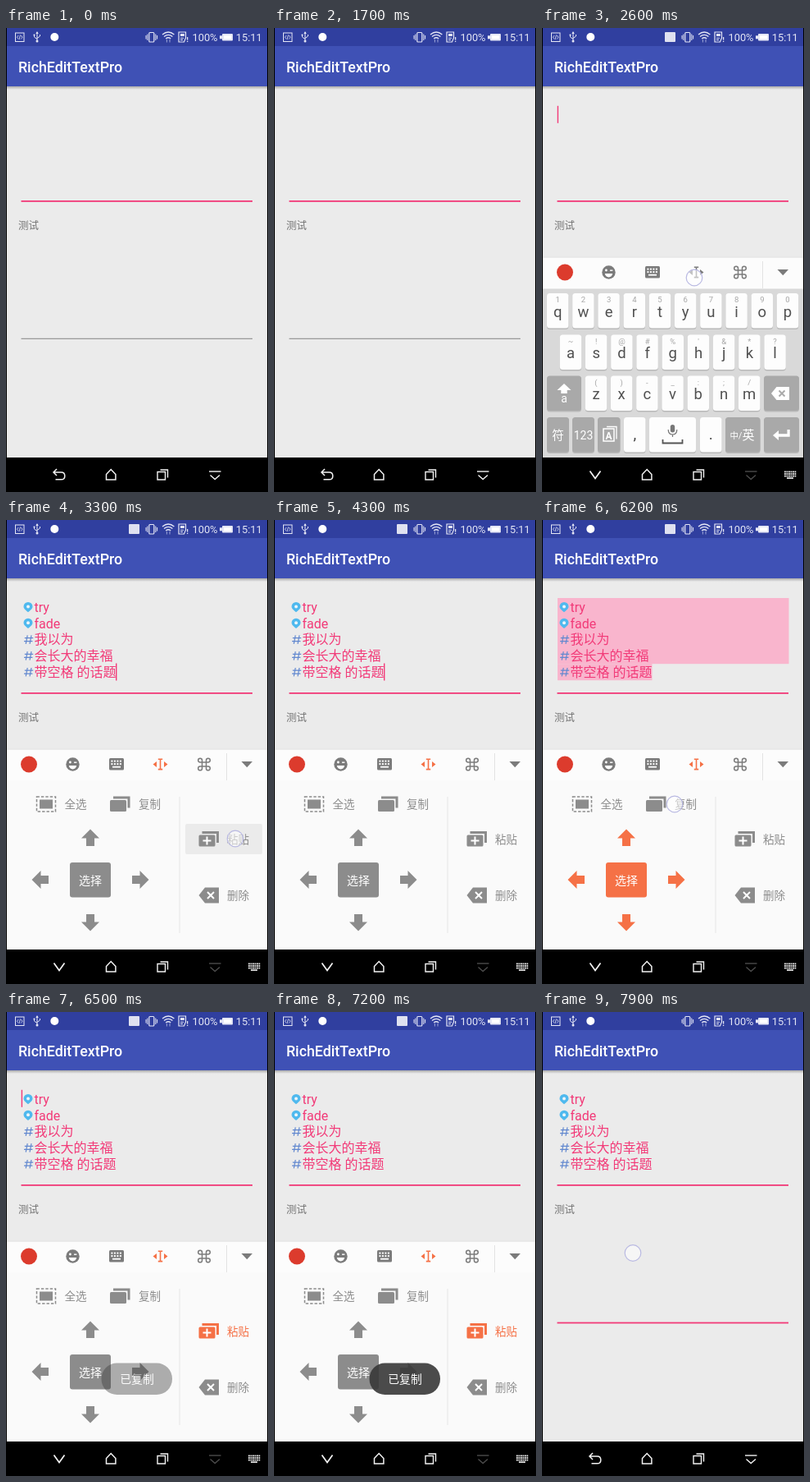
Recreate the animation shown at these times as an HTML page. Size 320 by 565 pixels, loop 8000 ms.

```html
<!DOCTYPE html>
<html lang="zh">
<head>
<meta charset="utf-8">
<title>RichEditTextPro</title>
<style>
  html, body { margin: 0; width: 100%; height: 100%; overflow: hidden; background: #000; }
  svg { display: block; width: 100vw; height: 100vh; font-family: Roboto, "Noto Sans CJK SC", "Noto Sans CJK", sans-serif; }
</style>
</head>
<body>
<svg id="stage" viewBox="0 0 320 565" xmlns="http://www.w3.org/2000/svg"></svg>
<script>
const LOOP = 8000, PINK = '#f23a78', ORANGE = '#f57146', GRAY = '#8c8c8c';

const rect = (x, y, w, h, fill, extra = '') =>
  `<rect x="${x}" y="${y}" width="${w}" height="${h}" fill="${fill}" ${extra}/>`;
const circle = (x, y, r, fill, extra = '') => `<circle cx="${x}" cy="${y}" r="${r}" fill="${fill}" ${extra}/>`;
const path = (d, fill, extra = '') => `<path d="${d}" fill="${fill}" ${extra}/>`;
const line = (d, stroke, width = 1, extra = '') =>
  `<path d="${d}" fill="none" stroke="${stroke}" stroke-width="${width}" ${extra}/>`;
const escapeText = s => s.replace(/&/g, '&amp;').replace(/</g, '&lt;');
const text = (s, x, y, size, fill, extra = '') =>
  `<text x="${x}" y="${y}" font-size="${size}" fill="${fill}" ${extra}>${escapeText(s)}</text>`;
const group = (id, body, extra = '') => `<g id="${id}" ${extra}>${body}</g>`;
const MID = 'text-anchor="middle"';

function statusBar() {
  const c = '#e4e6f5';
  return rect(1, 0, 318, 22, '#303f9f') +
    rect(11.5, 6, 10.5, 10.5, 'none', `stroke="${c}"`) +
    line('M15.2 9l-1.8 2.2 1.8 2.2M18.3 9l1.8 2.2-1.8 2.2M17.5 8.5l-1.4 5.4', c, .8) +
    line('M38 5v11M34.5 8.5v2.5l3.5 2.5M41.5 8v2l-3.5 2.5', c, 1) +
    path('M36.3 7l1.7-3 1.7 3z', c) + circle(38, 16, 1.5, c) + circle(34.5, 8.5, 1.1, c) +
    circle(59.3, 11, 5, '#fff') +
    group('imeStatus', rect(150, 5, 13, 12, '#dfe1f0', 'rx="1"')) +
    rect(174.8, 5.5, 6, 11.5, 'none', `rx="1" stroke="${c}" stroke-width="1.2"`) +
    line('M172.8 7.5v7.5M171 9v4.5M182.8 7.5v7.5M184.6 9v4.5', c, 1) +
    line('M191 8q7.2-6 14.4 0M193 10.5q5.2-4.4 10.4 0M195.2 13q3-2.6 6 0', c, 1.3) +
    line('M196.4 14v3.5M200 14v3.5', '#9da6d8', 1) +
    path('M211 5h8.5v7l-2 5H211z', 'none', `stroke="${c}" stroke-width="1.2"`) +
    rect(213, 7, 4.8, 3, c) + line('M213 12.3h4M213 14.5h3', c, 1) +
    line('M221.6 11v3.6M221.6 15.8v1.3', c, 1.3) +
    text('100%', 227.5, 16, 12.8, c) +
    rect(264, 7, 13, 8.5, c, 'rx="1"') + rect(261, 9.3, 3, 4, c) + rect(266, 9, 9, 4.5, '#fff') +
    text('15:11', 280.8, 16, 12.8, c);
}

function richText() {
  const rows = ['try', 'fade', '我以为', '会长大的幸福', '带空格 的话题'];
  return rows.map((s, i) => {
    const y = 106 + i * 19.8;
    const icon = i < 2
      ? path(`M27 ${y + 6.3}C24.5 ${y + 4} 21.5 ${y + 2.5} 21.5 ${y - .7}A5.5 5.3 0 0 1 32.5 ${y - .7}C32.5 ${y + 2.5} 29.5 ${y + 4} 27 ${y + 6.3}z`, '#4fb9ee') +
        circle(27, y - .5, 2, '#eef6fa')
      : line(`M26.2 ${y - 5.2}l-2 10.4M31 ${y - 5.2}l-2 10.4M22.8 ${y - 2}h10.4M22 ${y + 2}h10.4`, '#6288cf', 1.2);
    return icon + text(s, 34.5, y + 5.8, 16, PINK);
  }).join('');
}

function selection() {
  let s = rect(19, 95, 282.5, 80.2, '#f9b5cd');
  return s + rect(19, 175.2, 115.5, 20, '#f9b5cd');
}

function toolbar() {
  const c = '#7b7b7b';
  let keys = '';
  for (let r = 0; r < 2; r++) for (let k = 0; k < 4; k++) keys += rect(128.4 + k * 3.5, 292.6 + r * 3.5, 2, 2, '#fff');
  return rect(1, 279, 318, 39, '#fcfcfc') + line('M1 279.2h318', '#dedede', .8) +
    circle(28, 297.5, 10, '#dc3b2d') +
    circle(81.5, 297.5, 8.2, c) + circle(78.4, 295, 1.4, '#fff') + line('M83 295.2h3.4', '#fff', 1.4) +
    path('M76.8 299h9.4q-1 4.4-4.7 4.4t-4.7-4.4z', '#fff') +
    rect(126, 290, 18, 14.5, c, 'rx="1.5"') + keys + rect(130, 299.8, 10, 1.8, '#fff') +
    `<g id="moveIcon" color="${c}">` +
    line('M185.8 291.2h5.4M188.5 291.2v12.4M185.8 303.6h5.4', 'currentColor', 1.6) +
    path('M184 294v7l-4.5-3.5zM193 294v7l4.5-3.5z', 'currentColor') + '</g>' +
    line('M239.5 295h5v5h-5zM239.5 295h-2.4a2.4 2.4 0 1 1 2.4-2.4zM244.5 295v-2.4a2.4 2.4 0 1 1 2.4 2.4zM239.5 300v2.4a2.4 2.4 0 1 1-2.4-2.4zM244.5 300h2.4a2.4 2.4 0 1 1-2.4 2.4z', c, 1.5) +
    line('M269.5 284v33', '#e2e2e2') + path('M287.5 294h13.5l-6.7 7.2z', c);
}

function keyboard() {
  const key = (x, y, w, fill = '#fdfdfd') =>
    rect(x, y + 1, w, 43, '#b9b9b9', 'rx="3.5"') + rect(x, y, w, 42.5, fill, 'rx="3.5"');
  const letters = (chars, hints, x0, y) => [...chars].map((ch, i) => {
    const x = x0 + i * 31.2;
    return key(x - 13.2, y, 26.4) + text(hints[i], x, y + 11, 9.5, '#a6a6a6', MID) +
      text(ch, x, y + 28.5, 18.5, '#505050', MID);
  }).join('');
  const dark = '#a9a9a9';
  return rect(1, 317.5, 318, 206, '#d9d9d9') +
    letters('qwertyuiop', '1234567890', 19.2, 323) +
    letters('asdfghjkl', "~!@#%'&*?", 35, 373.5) +
    letters('zxcvbnm', '()-_:;/', 66, 423.5) +
    key(6, 423.5, 42, dark) + path('M27 433l8.5 8h-4.8v4h-7.4v-4h-4.8z', '#fff') + text('a', 27, 456, 14, '#fff', MID) +
    key(271, 423.5, 43, dark) + path('M280 445l6.5-8H302v16h-15.5z', '#fff') +
    line('M289.5 441.5l7 7M296.5 441.5l-7 7', dark, 1.8) +
    key(6, 474, 27, dark) + text('符', 19.5, 500.5, 14.5, '#fff', MID) +
    key(37, 474, 27, dark) + text('123', 50.5, 500.5, 14, '#fff', MID) +
    key(68, 474, 27.5, dark) + rect(75, 488, 13, 15, 'none', 'stroke="#fff" stroke-width="1.5"') +
    line('M79 485.5h12v15', '#fff', 1.3) + text('A', 81.5, 500.5, 12, '#fff', `${MID} font-weight="700"`) +
    key(100, 474, 26.5) + text(',', 113.3, 500.5, 19, '#444', MID) +
    key(131, 474, 57) + rect(156.8, 483, 5.4, 9.5, '#777', 'rx="2.7"') +
    line('M154.2 489q0 6 5.3 6t5.3-6M159.5 495v3', '#777', 1.2) + line('M147.5 501v4.5h24V501', '#555', 1.8) +
    key(193, 474, 26.5) + text('.', 206.3, 500.5, 19, '#444', MID) +
    key(224, 474, 42.5, dark) + text('中/', 229.5, 500, 10.5, '#fff') + text('英', 244.5, 500.5, 15, '#fff') +
    key(271, 474, 43, dark) + path('M282 496l7-6v4.3h10.5V489h3.2v8.7H289v4.3z', '#fff');
}

function panel() {
  const label = (s, x, y) => text(s, x, y, 13.5, 'currentColor');
  const arrow = (x, y, turn) => path('M0-10.5L11 .5H5V10H-5V.5H-11z', 'currentColor',
    `transform="translate(${x} ${y}) rotate(${turn})" stroke-linejoin="round"`);
  const cards = (x, y) => path(`M${x + 4} ${y}h20.5v14h-3v-11H${x + 4}z`, 'currentColor') +
    rect(x, y + 4.5, 20, 14, 'currentColor', 'rx="1.5"');
  const press = (id, x, y, w) => group(id, rect(x, y, w, 37, '#ebebeb', 'rx="2"'));
  return rect(1, 317.5, 318, 206, '#fafafa') +
    press('pressAll', 26, 328, 86) + press('pressCopy', 117, 328, 86) + press('pressPaste', 219, 370, 94) +
    `<g color="${GRAY}">` +
    rect(37.5, 337, 23, 18, 'none', 'stroke="currentColor" stroke-width="1.5" stroke-dasharray="3.4 2"') +
    rect(41, 340.5, 16, 11, 'currentColor') + label('全选', 71.5, 351) +
    cards(127, 336.5) + label('复制', 162, 351) +
    path('M235.5 457l7.5-9.5h17v19h-17z', 'currentColor') +
    line('M246 453l8 8M254 453l-8 8', '#fff', 2) + label('删除', 270, 462.3) + '</g>' +
    `<g id="paste" color="${GRAY}">` + cards(235.5, 379) +
    line('M245.5 385.5v10M240.5 390.5h10', '#fff', 2) + label('粘贴', 270, 394) + '</g>' +
    line('M212 337v166', '#e6e6e6') +
    `<g id="selectPad" color="${GRAY}">` +
    arrow(103, 387, 0) + arrow(164, 438, 90) + arrow(103, 490, 180) + arrow(42, 438, -90) +
    rect(78, 417, 50, 42.5, 'currentColor', 'rx="3"') + text('选择', 103, 443.5, 14, '#fff', MID) + '</g>';
}

function navBar() {
  const w = '#f2f2f2';
  const chevron = (x, c) => line(`M${x - 7} 540h14.5`, c, 1.4) + line(`M${x - 5.5} 544.5l5.7 5 5.7-5`, c, 1.4);
  let dots = '';
  for (let r = 0; r < 3; r++) for (let k = 0; k < 6; k++) dots += rect(296 + k * 2.5, 539.5 + r * 2.6, 1.8, 1.8, w);
  return rect(0, 523, 320, 42, '#000') +
    line('M122.5 543.5l5.7-6 5.7 6v6.5h-11.4z', w, 1.5) +
    line('M185 540.5h9.5v9.5H185zM188.5 538h9v9.5', w, 1.4) +
    group('navIdle', line('M62 537l-4 4 4 4M58 541h9.5q4.3 0 4.3 4.4t-4.3 4.4H60.5', w, 1.5) + chevron(255, w)) +
    group('navTyping', line('M58.5 539.5l6.5 9 6.5-9', w, 1.7) + chevron(255, '#4b4b4b') + dots + rect(299, 547.3, 8, 1.6, w));
}

const stage = document.getElementById('stage');
stage.innerHTML =
  '<defs><clipPath id="content"><rect x="1" y="71" width="318" height="452"/></clipPath>' +
  '<linearGradient id="shade" x2="0" y2="1"><stop stop-color="#000" stop-opacity=".28"/><stop offset="1" stop-color="#000" stop-opacity="0"/></linearGradient></defs>' +
  rect(0, 0, 320, 565, '#000') + rect(1, 22, 318, 501, '#ebebeb') +
  group('selection', selection()) + group('richText', richText()) +
  group('caret', rect(-.7, 0, 1.4, 21, PINK)) +
  rect(18.5, 210, 282.5, 1.8, PINK) + text('测试', 15, 245.3, 12.5, '#747474') +
  group('idleLine', rect(18.5, 377.8, 282.5, .9, '#777')) +
  group('activeLine', rect(18.5, 377.6, 282.5, 1.8, PINK)) +
  rect(1, 71, 318, 4, 'url(#shade)') + rect(1, 22, 318, 49, '#3f51b5') +
  text('RichEditTextPro', 15, 53.7, 17.8, '#fff', 'font-weight="500"') + statusBar() +
  `<g clip-path="url(#content)">${group('ime', toolbar() + group('keyboard', keyboard()) + group('panel', panel()))}</g>` +
  navBar() +
  group('toast', rect(116.5, 427.5, 86.5, 38.5, '#383838', 'rx="19"') + text('已复制', 160, 451.8, 13.8, '#fff', MID)) +
  group('touch', circle(0, 0, 9.8, '#fff', 'fill-opacity=".55" stroke="#b9b9e2" stroke-width="1.2"'));

const part = {};
stage.querySelectorAll('g[id]').forEach(g => part[g.id] = g);

const within = (t, a, b) => t >= a && t < b;
const ramp = (t, a, b) => Math.min(1, Math.max(0, (t - a) / (b - a)));
const show = (id, on) => part[id].setAttribute('display', on ? 'inline' : 'none');

// start, end, x, y
const taps = [
  [1900, 2100, 92, 152], [2600, 2800, 186, 304], [3100, 3400, 280, 388], [4600, 4800, 67, 343],
  [5300, 5500, 67, 343], [6200, 6400, 162, 346], [7000, 7200, 65, 544], [7800, 8000, 111, 293.5]
];
const caretAtStart = [[200, 600], [1100, 1700], [1900, 3100], [6500, 7000], [7500, 7900]];
const caretAtEnd = [[3300, 3800], [4300, 4800], [5300, 5400]];

function render(t) {
  const any = spans => spans.some(([a, b]) => within(t, a, b));
  const atEnd = any(caretAtEnd);
  show('caret', atEnd || any(caretAtStart));
  part.caret.setAttribute('transform', atEnd ? 'translate(134.7 174.5)' : 'translate(19.4 94.8)');

  const pasted = t >= 3300, selecting = within(t, 5400, 6500);
  show('richText', pasted);
  show('selection', selecting);
  show('activeLine', t >= 7900);
  show('idleLine', t < 7900);

  const rise = 1 - (1 - ramp(t, 2100, 2400)) ** 2, fall = ramp(t, 7200, 7500) ** 2;
  const open = rise * (1 - fall);
  show('ime', open > 0);
  part.ime.setAttribute('opacity', open);
  part.ime.setAttribute('transform', `translate(0 ${(1 - open) * 26})`);
  const typing = within(t, 2200, 7400);
  show('imeStatus', typing);
  show('navTyping', typing);
  show('navIdle', !typing);

  const editing = t >= 2700;
  show('keyboard', !editing);
  show('panel', editing);
  part.moveIcon.setAttribute('color', editing ? ORANGE : '#7b7b7b');
  part.selectPad.setAttribute('color', selecting ? ORANGE : GRAY);
  part.paste.setAttribute('color', t >= 6400 ? ORANGE : GRAY);
  show('pressPaste', within(t, 3200, 3400));
  show('pressAll', within(t, 5400, 5500));
  show('pressCopy', within(t, 6300, 6400));

  part.toast.setAttribute('opacity', .9 * ramp(t, 6360, 6680) * (1 - ramp(t, 7200, 7500)));

  const tap = taps.find(([a, b]) => within(t, a, b));
  show('touch', tap);
  if (tap) part.touch.setAttribute('transform', `translate(${tap[2]} ${tap[3]})`);
}

const start = performance.now();
function tick() {
  render((performance.now() - start) % LOOP);
  requestAnimationFrame(tick);
}
tick();
</script>
</body>
</html>
```
